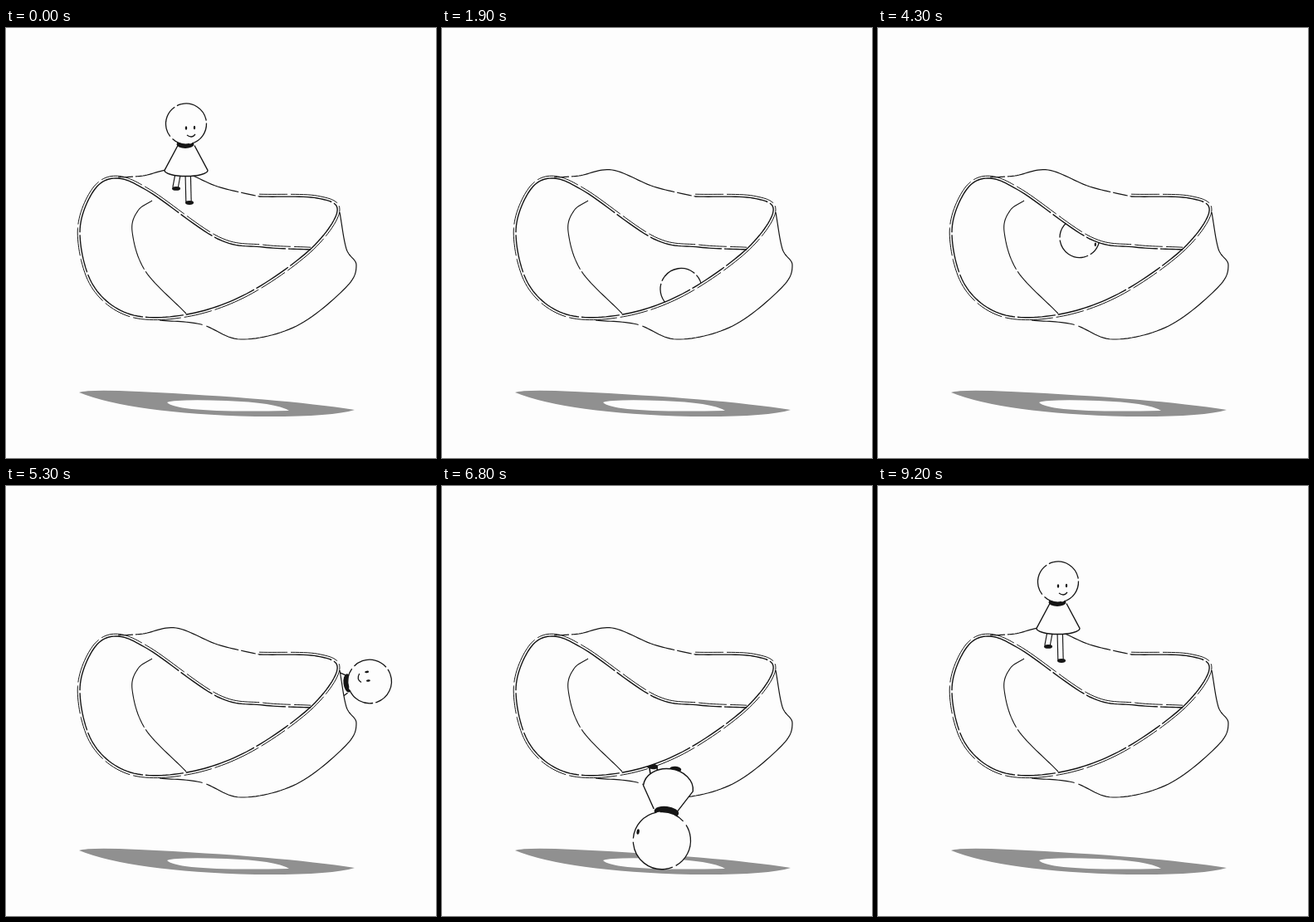
These frames come from a looping animation (518 px wide and 518 px high, 9300 ms). An HTML page with a canvas:

```html
<!DOCTYPE html>
<html lang="en">
<head>
<meta charset="utf-8">
<title>Walk on a twisted band</title>
<style>
html, body { margin: 0; width: 100%; height: 100%; overflow: hidden; background: #fdfdfd; }
canvas { display: block; width: 518px; height: 518px; }
</style>
</head>
<body>
<canvas id="stage" width="518" height="518"></canvas>
<script>
const SIZE = 518, STEP = 100, STEPS = 93, POSES = 80, DETAIL = 14;
const PAPER = '#fdfdfd', INK = '#151515';
const HOLDS = [6, 11, 16, 21, 31, 36, 41, 46, 51, 66, 71, 81];
const ctx = document.getElementById('stage').getContext('2d');

// Smooth value of rows [key, ...values] at a key
function sample(rows, key) {
  let i = 0;
  while (i < rows.length - 2 && rows[i + 1][0] <= key) i++;
  const b = rows[i], c = rows[i + 1], a = rows[i - 1] || b, d = rows[i + 2] || c;
  const span = c[0] - b[0], u = (key - b[0]) / span, v = 1 - u;
  return b.slice(1).map((from, k) => {
    const n = k + 1, to = c[n];
    const out = (to - a[n]) / (c[0] - a[0]) * span;
    const into = (d[n] - from) / (d[0] - b[0]) * span;
    return v * v * ((1 + 2 * u) * from + u * out) + u * u * ((1 + 2 * v) * to - v * into);
  });
}

// Dense points of a curve through a few knots, "x,y x,y ..."
function curve(knots) {
  const rows = knots.split(' ').map((p, i) => [i, ...p.split(',').map(Number)]);
  const count = (rows.length - 1) * DETAIL + 1;
  return Array.from({ length: count }, (_, i) => sample(rows, i / DETAIL));
}
const cut = (pts, a, b) => pts.slice(a * DETAIL, b * DETAIL + 1);

function offset(pts, dist) {
  return pts.map(([x, y], i) => {
    const a = pts[Math.max(0, i - 1)], b = pts[Math.min(pts.length - 1, i + 1)];
    const dx = b[0] - a[0], dy = b[1] - a[1], n = Math.hypot(dx, dy);
    return [x + dy / n * dist, y - dx / n * dist];
  });
}
function line(...chains) {
  const path = new Path2D();
  chains.flat().forEach(p => path.lineTo(...p));
  return path;
}
function area(...chains) {
  const path = line(...chains);
  path.closePath();
  return path;
}
function except(...holes) {
  const path = new Path2D();
  path.rect(0, 0, SIZE, SIZE);
  holes.forEach(h => path.addPath(h));
  return path;
}

// Twisted band
const edge = curve('305,203 375,205 399,221 365,268 290,320 218,345 150,345 105,310 89,246 105,197 132,181 172,197 255,254 310,264 367,267');
const rim = offset(edge, 2.8);
const crest = curve('135,180 165,178 205,171 255,191 305,203');
const hull = curve('185,352 235,357 283,375 350,359 409,313 422,286 410,266 402,222');
const inner = curve('176,208 159,220 152,245 168,293 217,344');
const shadow = new Path2D('M88 439Q100 435 160 438Q330 446 420 460Q390 469 300 468Q150 464 88 439ZM194 451Q205 447 265 449Q325 451 341 461Q205 464 194 451Z');

const double = (a, b) => [
  { path: line(cut(edge, a, b)), width: 1.4, dash: [88, 3, 46, 3] },
  { path: line(cut(rim, a, b)), width: 1, dash: [34, 4, 58, 4] }
];
const back = double(0, 2), front = double(2, 10), upper = double(10, 14);
const walls = [
  { path: line(crest), width: 1.2, dash: [18, 3, 130, 3] },
  { path: line(hull), width: 1.2, dash: [52, 5, 400, 0] },
  { path: line(inner), width: 1.1, dash: [96, 3] }
];
const allLines = [...walls, ...back, ...front, ...upper];

// Where the walker shows, and which lines pass in front, until a pose
const outline = area(crest, cut(edge, 0, 2), [...hull].reverse(), cut(rim, 5, 10));
const loop = area(cut(edge, 3, 14));
const gap = area(inner, cut(edge, 3, 5).reverse(), cut(edge, 11, 14).reverse());
const above = area([[0, 0], [SIZE, 0], [SIZE, 221]], cut(edge, 2, 9), [[0, 197]]);
const zones = [
  { until: 27, clip: above, cover: front },
  { until: 39, clip: loop, cover: [...front, ...upper] },
  { until: 46, clip: except(outline, gap), cover: allLines },
  { until: 61, clip: except(loop), cover: [] },
  { until: 78, clip: except(outline), cover: allLines },
  { until: POSES, clip: above, cover: front }
];

// pose, head x, head y, head radius, lean in degrees
const route = [
  [0, 217, 115.5, 24.5, 0], [5, 276, 171, 23, -6], [9, 342, 249, 24, -60],
  [16, 288, 314.5, 25, -40], [26, 154, 236, 24, 13], [30, 178, 246, 24, 115],
  [36, 243, 252.5, 24, 182], [42, 385, 236, 24, 90], [46, 476, 244, 29, 88],
  [51, 458, 309, 32, 103], [56, 322, 405, 34, 180], [60, 214, 428, 34, 190],
  [66, 113, 325, 24, 240], [70, 100, 205, 24, 275], [78, 184, 100, 24, 350],
  [80, 217, 115.5, 24.5, 360]
];

function drawLines(list) {
  ctx.strokeStyle = INK;
  for (const { path, width, dash } of list) {
    ctx.lineWidth = width;
    ctx.setLineDash(dash);
    ctx.stroke(path);
  }
  ctx.setLineDash([]);
}

function dot(x, y, rx, ry) {
  ctx.beginPath();
  ctx.ellipse(x, y, rx, ry, 0, 0, 7);
  ctx.fill();
}

function leg(x, hip, foot) {
  for (const [color, width] of [[INK, 7.5], [PAPER, 5.2]]) {
    ctx.strokeStyle = color;
    ctx.lineWidth = width;
    ctx.beginPath();
    ctx.moveTo(x * 0.7, hip);
    ctx.lineTo(x, foot);
    ctx.stroke();
  }
  ctx.fillStyle = INK;
  dot(x + 1, foot + 1, 5, 2.4);
}

// The face slides around the head and vanishes past its rim
function face(p) {
  const upright = p < 20 || p > 66;
  const x = upright ? 5 + 2.4 * Math.min(p, POSES - p) : 10 + 2.3 * (p - 51);
  const y = Math.min(0, x) / 2;
  ctx.save();
  ctx.beginPath();
  ctx.arc(0, 0, 23.5, 0, 7);
  ctx.clip();
  ctx.fillStyle = ctx.strokeStyle = INK;
  dot(x - 5, y + 5, 1.2, 2.3);
  dot(x + 5, y + 4.5, 1.2, 2.3);
  ctx.beginPath();
  ctx.moveTo(x - 4, y + 13.5);
  ctx.quadraticCurveTo(x + 2, y + 18, x + 6, y + 12.5);
  ctx.stroke();
  ctx.restore();
}

function walker(p) {
  const [x, y, r, lean] = sample(route, p);
  const scale = r / 24.5;
  // Full length at the top of the walk, seen from below at the far side
  const full = Math.max(0, Math.cos(p / POSES * 2 * Math.PI)) ** 6;
  const below = Math.exp(-(((p - 52) / 10) ** 2));
  const hem = 49 + 7 * full - 6 * below;
  const wide = 22 + 4 * full - below;
  const deep = 7 + 14 * below;
  const legs = 16 + 22 * full;
  const shift = -5 + 14 * below;
  const swing = Math.cos(p * Math.PI / 4);
  const lift = s => 0.45 * legs * Math.max(0, s);

  ctx.save();
  ctx.translate(x, y);
  ctx.rotate(lean * Math.PI / 180);
  ctx.scale(scale, scale);

  leg(shift - 10 + 2 * swing, hem, hem + legs - lift(swing));
  leg(shift + 10 - 2 * swing, hem, hem + legs - lift(-swing));

  ctx.fillStyle = PAPER;
  ctx.strokeStyle = INK;
  ctx.lineWidth = 1.4 / scale;
  ctx.beginPath();
  ctx.moveTo(-10, 26);
  ctx.lineTo(-wide, hem);
  ctx.ellipse(0, hem, wide, deep, 0, Math.PI, 0, true);
  ctx.lineTo(10, 26);
  ctx.fill();
  ctx.stroke();

  ctx.fillStyle = INK;
  dot(-1, 24.5, 10.5, 5);

  ctx.fillStyle = PAPER;
  ctx.lineWidth = 1.3 / scale;
  ctx.beginPath();
  ctx.arc(0, 0, 24.5, -1.8, 4.48);
  ctx.fill();
  ctx.setLineDash([40, 3, 32, 3, 22, 4]);
  ctx.stroke();
  ctx.setLineDash([]);
  face(p);
  ctx.restore();
}

function draw(p) {
  const { clip, cover } = zones.find(z => p < z.until);
  ctx.fillStyle = PAPER;
  ctx.fillRect(0, 0, SIZE, SIZE);
  ctx.fillStyle = '#909090';
  ctx.fill(shadow, 'evenodd');
  drawLines(allLines.filter(l => !cover.includes(l)));
  ctx.save();
  ctx.clip(clip, 'evenodd');
  walker(p);
  ctx.restore();
  drawLines(cover);
}

const start = performance.now();
function tick() {
  const step = Math.floor((performance.now() - start) / STEP) % STEPS;
  draw((step - HOLDS.filter(h => h <= step).length) % POSES);
  requestAnimationFrame(tick);
}
tick();
</script>
</body>
</html>
```
